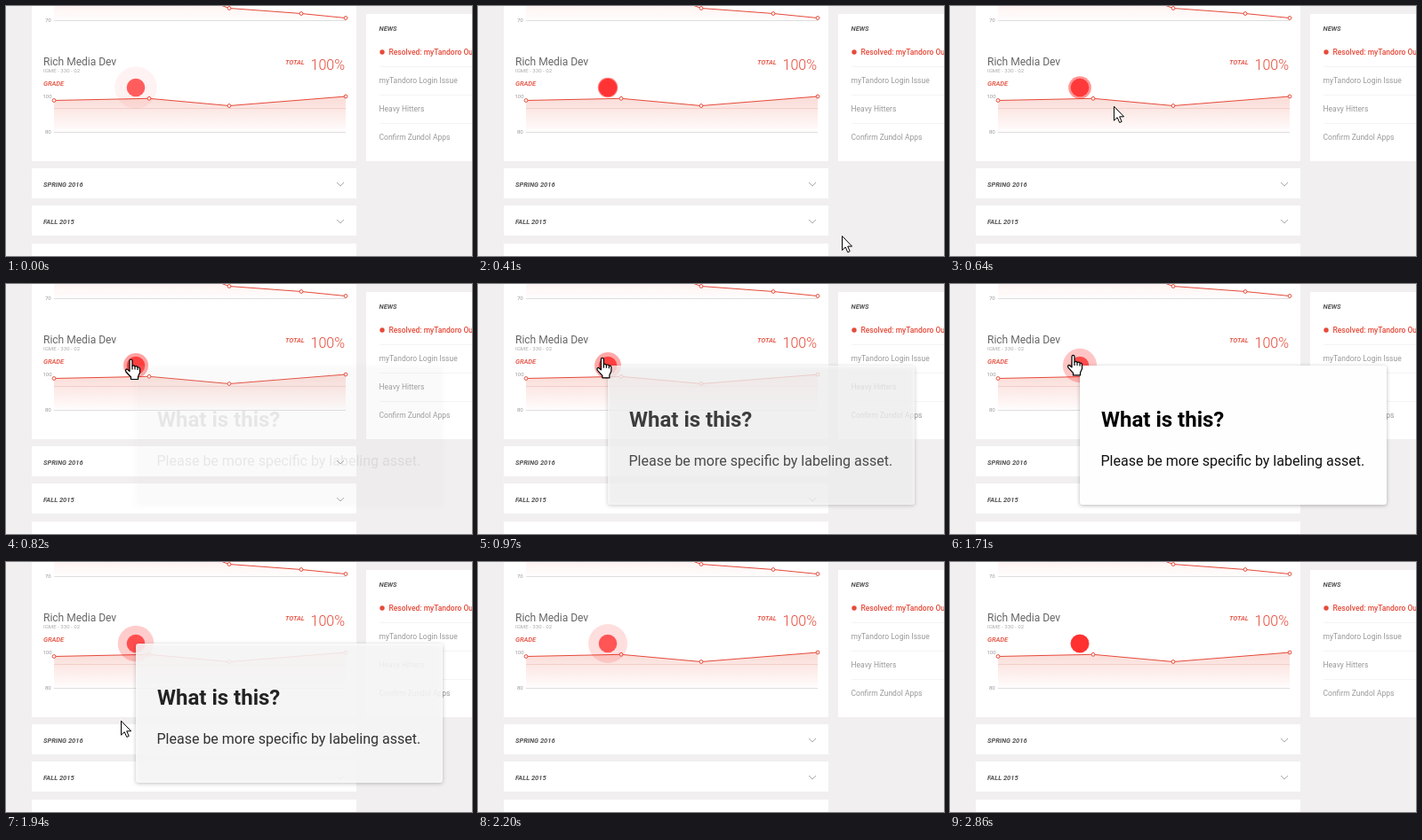
These frames come from a looping animation (524 by 282 pixels, 2910 ms). An HTML page with a canvas:

```html
<!DOCTYPE html>
<html lang="en">
<head>
<meta charset="utf-8">
<title>Pulse hint</title>
<style>
html, body { margin: 0; width: 100%; height: 100%; overflow: hidden; background: #f1eff0; }
canvas { display: block; width: 524px; height: 282px; }
</style>
</head>
<body>
<canvas id="stage"></canvas>
<script>
const W = 524, H = 282, LOOP = 2910;
const RED = '#e64a3a', GREY = '#999';
const canvas = document.getElementById('stage');
const ctx = canvas.getContext('2d');
const dpr = window.devicePixelRatio || 1;
canvas.width = W * dpr;
canvas.height = H * dpr;

// time, radius, opacity of the spreading ring
const PULSE = [
  [30, 10.5, .5], [210, 10.5, .5], [410, 11.3, .48], [820, 14, .37], [1280, 17, .28],
  [1940, 20.3, .2], [2200, 22, .13], [2580, 22.2, .12], [2860, 23.6, .04]
];
// time, x, y of the pointer's hot spot
const ARRIVE = [410, 409, 259, 720, 140.5, 84.5];
const POINTER = [
  [720, 140.5, 84.5], [820, 140.5, 84.5], [1280, 138.5, 79.5], [1790, 138.5, 80],
  [1840, 131, 113], [1940, 129, 178], [2100, 132, 288]
];

const HAND = new Path2D('M5 14V2Q5 .5 6.5 .5Q8 .5 8 2V8Q9.7 6.7 11 8.5Q12.7 7.5 14 9.3Q16.5 8.9 16.5 11.5V15.5L14.5 20V23H6.5V20.5L1 14.5Q-.2 12 2 11.4Z');
const KNUCKLES = new Path2D('M8 8V12M11 8.5V12M14 9.5V12.5');
const ARROW = new Path2D('M.5 .5V16.5L4.2 13L6.8 18.8L9.2 17.7L6.7 12.1H11.6Z');

const smooth = p => { p = Math.min(1, Math.max(0, p)); return p * p * (3 - 2 * p); };

function track(t, keys) {
  if (t <= keys[0][0]) return keys[0].slice(1);
  for (let i = 1; i < keys.length; i++) {
    const a = keys[i - 1], b = keys[i];
    if (t <= b[0]) {
      const p = (t - a[0]) / (b[0] - a[0]);
      return [1, 2].map(k => a[k] + (b[k] - a[k]) * p);
    }
  }
  return keys[keys.length - 1].slice(1);
}

function text(str, x, y, size, color, style = '400') {
  ctx.font = `${style} ${size}px Roboto, sans-serif`;
  ctx.fillStyle = color;
  ctx.fillText(str, x, y);
}

function rect(x, y, w, h, color) {
  ctx.fillStyle = color;
  ctx.fillRect(x, y, w, h);
}

function disc(x, y, r, color) {
  ctx.beginPath();
  ctx.arc(x, y, r, 0, 7);
  ctx.fillStyle = color;
  ctx.fill();
}

function trace(points) {
  ctx.beginPath();
  points.forEach(([x, y]) => ctx.lineTo(x, y));
}

function chart(points, top, base, strength) {
  const fill = ctx.createLinearGradient(0, top, 0, base);
  fill.addColorStop(0, `rgba(230,74,50,${strength})`);
  fill.addColorStop(1, 'rgba(230,74,50,.01)');
  trace([...points, [382, base], [54, base]]);
  ctx.fillStyle = fill;
  ctx.fill();
  rect(54, base, 328, 1, '#dedede');
  trace(points);
  ctx.strokeStyle = RED;
  ctx.lineWidth = 1;
  ctx.stroke();
  for (const [x, y] of points) {
    disc(x, y, 1.9, '#fff');
    ctx.stroke();
  }
}

function chevron(y) {
  trace([[372, y], [376, y + 4], [380, y]]);
  ctx.strokeStyle = '#aaa';
  ctx.lineWidth = 1;
  ctx.stroke();
}

function page() {
  rect(0, 0, W, H, '#f1eff0');
  rect(29, 0, 365, 175, '#fff');
  rect(29, 183, 365, 34, '#fff');
  rect(29, 225, 365, 34, '#fff');
  rect(29, 268, 365, 14, '#fff');
  rect(405, 9, 119, 166, '#fff');

  chart([[54, -30], [161, -30], [251, 2.5], [332, 8.5], [382, 13.5]], -30, 16, .16);
  text('70', 44, 18, 6, GREY);

  text('Rich Media Dev', 42, 66.5, 12, '#666');
  text('IGME - 330 - 02', 42, 75, 6.1, '#aaa');
  text('GRADE', 42, 90, 7.5, RED, 'italic 500');
  text('TOTAL', 314, 66, 7.5, RED, 'italic 500');
  text('100%', 342.5, 72, 16, RED, '300');

  chart([[54, 106.5], [161, 104.3], [251, 112.5], [382, 102]], 102, 142, .2);
  rect(54, 115, 328, 1, 'rgba(200,110,90,.2)');
  text('100', 41.5, 104, 6, GREY);
  text('80', 44, 144, 6, GREY);

  text('SPRING 2016', 42, 204.3, 7.5, '#555', 'italic 700');
  text('FALL 2015', 42, 246.3, 7.5, '#555', 'italic 700');
  chevron(199);
  chevron(241);

  text('NEWS', 419.5, 27.5, 7.5, '#555', 'italic 700');
  disc(423, 52, 2.7, RED);
  text('Resolved: myTandoro Outage', 430.5, 55, 8.5, RED, '500');
  ['myTandoro Login Issue', 'Heavy Hitters', 'Confirm Zundol Apps'].forEach((s, i) => {
    rect(420, 68 + 32 * i, 104, 1, '#f5f4f4');
    text(s, 419.5, 87.2 + 32 * i, 8.5, GREY);
  });
}

function pulse(t) {
  const [r, a] = t < 30 ? [23.8, .05] : t >= 2860 ? [10.5, .5] : track(t, PULSE);
  disc(146, 92, 10.3, '#ff6262');
  disc(146, 92, r, `rgba(255,0,0,${a})`);
}

function dialog(t) {
  const alpha = t < 1500 ? smooth((t - 770) / 300) : 1 - smooth((t - 1870) / 300);
  if (alpha <= 0) return;
  ctx.save();
  ctx.globalAlpha = alpha;
  ctx.save();
  ctx.shadowColor = 'rgba(0,0,0,.28)';
  ctx.shadowBlur = 4 * dpr;
  ctx.shadowOffsetY = dpr;
  ctx.beginPath();
  ctx.roundRect(146, 92, 345, 157, 3);
  ctx.fillStyle = '#fefefe';
  ctx.fill();
  ctx.restore();
  text('What is this?', 170, 161, 24, '#000', '700');
  text('Please be more specific by labeling asset.', 169.5, 205, 16, '#111');
  ctx.restore();
}

function pointer(t) {
  if (t < 405 || t > 2100) return;
  let [x, y] = track(t, POINTER);
  if (t < 720) {
    const [t0, x0, y0, t1, x1, y1] = ARRIVE;
    const p = smooth((t - t0) / (t1 - t0));
    x = x0 + (x1 - x0) * p;
    y = y0 + (y1 - y0) * p;
  }
  const over = Math.hypot(x - 146, y - 92) < 17;
  const shape = over ? HAND : ARROW;
  ctx.save();
  ctx.translate(over ? x - 6.5 : x, y);
  ctx.lineWidth = over ? 1.2 : 1;
  ctx.lineJoin = 'round';
  ctx.fillStyle = '#fff';
  ctx.strokeStyle = '#000';
  ctx.fill(shape);
  ctx.stroke(shape);
  if (over) ctx.stroke(KNUCKLES);
  ctx.restore();
}

const start = performance.now();
function frame(now) {
  const t = Math.max(0, now - start) % LOOP;
  ctx.setTransform(dpr, 0, 0, dpr, 0, 0);
  page();
  pulse(t);
  dialog(t);
  pointer(t);
  requestAnimationFrame(frame);
}
frame(start);
</script>
</body>
</html>
```
